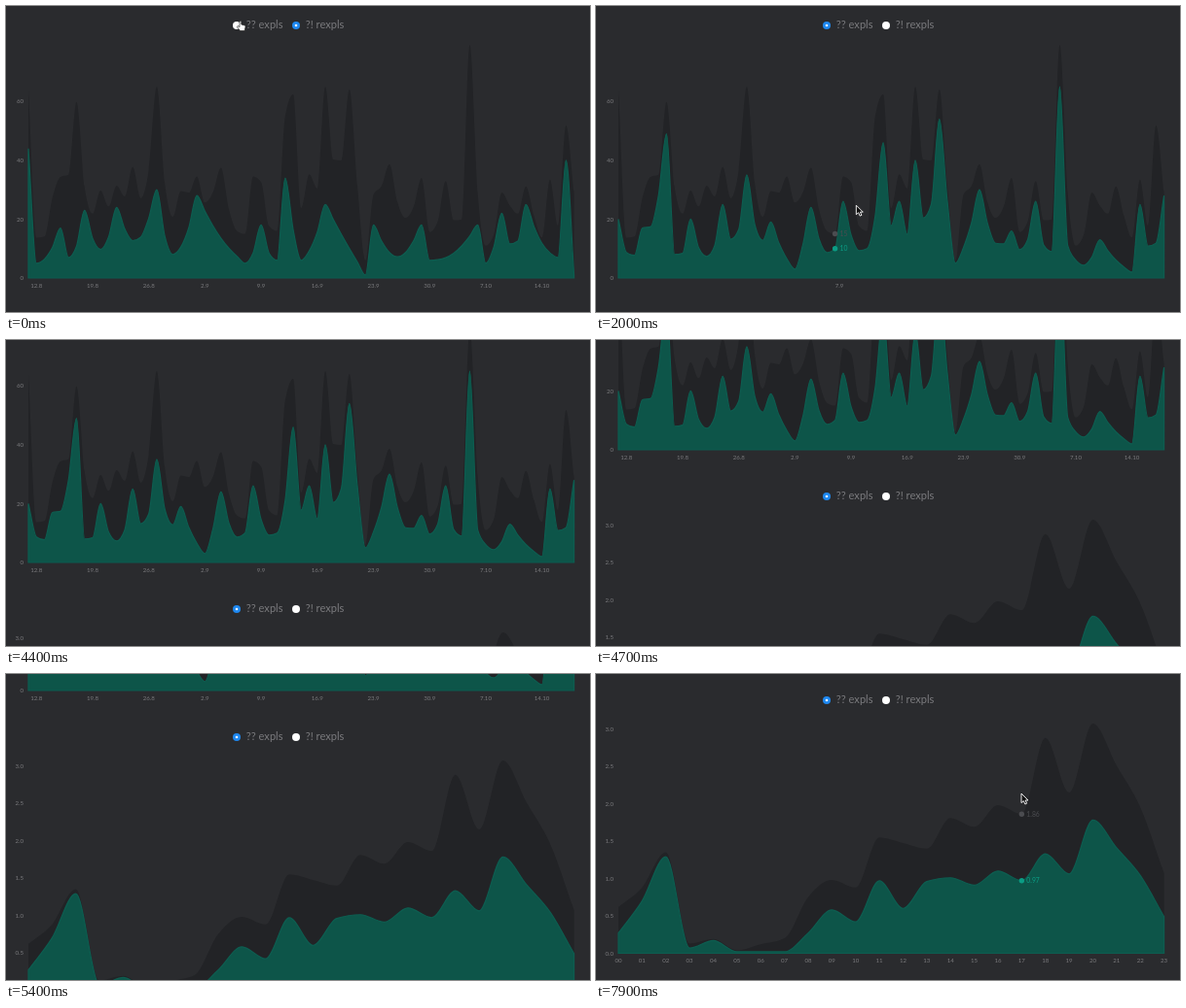
Write an HTML page that moves like this. It is 600 px wide and 315 px high and loops after 8 s.

```html
<!DOCTYPE html>
<html lang="en">
<head>
<meta charset="utf-8">
<title>Charts</title>
<style>
  html, body { margin: 0; width: 100%; height: 100%; overflow: hidden; background: #2a2b2e; }
  svg { display: block; width: 100vw; height: 100vh; }
  text { font-family: Lato, "Open Sans", sans-serif; }
  .tick { font-size: 6.1px; fill: #7b7b7e; }
  .legend { font-size: 11.1px; fill: #7a7a7d; }
  .total { fill: #222326; }
  .part { fill: #0d5549; stroke: #0d5d50; stroke-width: 1.2; }
</style>
</head>
<body>
<svg id="stage" viewBox="0 0 600 315"></svg>
<script>
const LOOP = 8000, LEFT = 23, WIDTH = 560.6;
const stage = document.getElementById('stage');

const clamp = (v, lo, hi) => Math.max(lo, Math.min(hi, v));
const lerp = (a, b, p) => a + (b - a) * p;
const part = (t, from, to) => clamp((t - from) / (to - from), 0, 1);
const easeOut = (p, power) => 1 - (1 - p) ** power;
const easeInOut = p => (1 - Math.cos(Math.PI * p)) / 2;

// Fills the gaps between key values; the line sags between two high ones
function fill(keys, sag = 0) {
  const at = Object.keys(keys).map(Number), out = [keys[0]];
  for (let k = 1; k < at.length; k++) {
    const from = at[k - 1], to = at[k], a = keys[from], b = keys[to];
    for (let i = from + 1; i <= to; i++) {
      const p = (i - from) / (to - from);
      out.push(lerp(a, b, p) - sag * Math.min(a, b) * Math.sin(Math.PI * p));
    }
  }
  return out;
}

const rexpls = fill({ 0: 44, 1: 5, 4: 17, 5: 7, 7: 23, 11: 24, 16: 30, 18: 8, 21: 28, 27: 5, 29: 18,
  31: 6, 32: 34, 34: 6, 37: 25, 42: 1, 43: 18, 49: 18, 50: 6, 56: 18, 57: 5, 59: 22, 62: 25, 66: 7,
  67: 40, 68: 1 }, .6);
const expls = fill({ 0: 20, 3: 17, 6: 49, 7: 8, 9: 20, 12: 11, 13: 25, 16: 35, 19: 19, 22: 3, 24: 24,
  27: 10, 28: 26, 31: 10, 33: 46, 35: 26, 37: 40, 40: 54, 42: 5, 45: 30, 49: 16, 52: 26, 54: 9, 55: 65,
  56: 11, 60: 13, 64: 2, 65: 25, 68: 28 }, .7);
const daily = expls.map((v, i) => v + rexpls[i]);

const hourly = fill({ 0: .27, 1: .7, 2: 1.29, 3: .07, 4: .17, 5: .02, 7: .02, 8: .27, 9: .58, 10: .42,
  11: .97, 12: .6, 13: .96, 14: 1.01, 15: .91, 16: 1.1, 17: .97, 18: 1.33, 19: 1.06, 20: 1.78,
  22: 1.04, 23: .49 });
const hourlyTotal = fill({ 0: .62, 1: .88, 2: 1.35, 3: .13, 4: .19, 5: .04, 7: .2, 8: .75, 9: .98,
  10: .88, 11: 1.55, 13: 1.4, 14: 1.81, 15: 1.69, 16: 1.98, 17: 1.86, 18: 2.88, 19: 2.15, 20: 3.07,
  22: 1.95, 23: 1.07 });

function scrollAt(t) {
  return Math.round(178 * easeInOut(part(t, 4176, 4800)) + 123 * easeOut(part(t, 4920, 6400), 3));
}

// Cursor moves: start, end, x, y
const moves = [
  [950, 1600, 168, 172], [1800, 2200, 300, 216], [2450, 3080, 334, 322],
  [6430, 7150, 298, 39], [7350, 7900, 437, 123]
];
function cursorAt(t) {
  return moves.reduce(([x, y], [from, to, nx, ny]) => {
    const p = easeOut(part(t, from, to), 2);
    return [lerp(x, nx, p), lerp(y, ny, p)];
  }, [240, 15]);
}

function set(el, attrs) {
  for (const k in attrs) el.setAttribute(k, attrs[k]);
}
function add(parent, tag, attrs = {}, text) {
  const el = document.createElementNS('http://www.w3.org/2000/svg', tag);
  set(el, attrs);
  if (text !== undefined) el.textContent = text;
  parent.append(el);
  return el;
}
const show = (el, on) => set(el, { visibility: on ? 'visible' : 'hidden' });

// Monotone cubic through evenly spaced points
function curve(ys, step) {
  const d = ys.slice(1).map((y, i) => (y - ys[i]) / step);
  const m = ys.map((_, i) => {
    const a = d[i - 1], b = d[i];
    if (a === undefined) return b;
    if (b === undefined) return a;
    return a * b <= 0 ? 0 : Math.sign(a) * Math.min(Math.abs(a), Math.abs(b), Math.abs(a + b) / 4) * 2;
  });
  let path = `M${LEFT} ${ys[0].toFixed(2)}`;
  for (let i = 1; i < ys.length; i++) {
    const x = LEFT + i * step, h = step / 3;
    path += `C${[x - step + h, ys[i - 1] + m[i - 1] * h, x - h, ys[i] - m[i] * h, x, ys[i]]
      .map(v => v.toFixed(2)).join(' ')}`;
  }
  return path;
}

class Chart {
  constructor(parent, options) {
    Object.assign(this, options);
    this.step = WIDTH / (this.total.length - 1);
    const g = add(parent, 'g');
    this.radios = [[237, '?? expls'], [298, '?! rexpls']].map(([x, label]) => {
      const disc = add(g, 'circle', { cx: x, cy: this.legendY, r: 4 });
      add(g, 'circle', { cx: x, cy: this.legendY, r: 1.3, fill: '#fff' });
      add(g, 'text', { x: x + 9.8, y: this.legendY + 3.4, class: 'legend' }, label);
      return disc;
    });
    add(g, 'path', { class: 'total', d: this.area(this.total) });
    this.front = add(g, 'path', { class: 'part' });
    for (let v = 0; v <= this.yMax; v += this.yStep)
      add(g, 'text', { x: 18, y: this.y(v) + 2.2, class: 'tick', 'text-anchor': 'end' }, v.toFixed(this.digits));
    this.ticks = add(g, 'g');
    for (let i = this.first; i < this.total.length; i += this.every)
      this.tick(this.ticks, this.x(i), this.name(i));
    this.hover = add(g, 'g');
    this.marks = ['#4b4c50', '#0b9c84'].map(fill => ({
      dot: add(this.hover, 'circle', { r: 2.7, fill }),
      label: add(this.hover, 'text', { fill, 'font-size': 6.8 })
    }));
    this.hoverTick = this.tick(this.hover, 0, '');
  }
  x(i) { return LEFT + i * this.step; }
  y(v) { return this.base - v * this.unit; }
  area(values) {
    return `${curve(values.map(v => this.y(v)), this.step)}V${this.base}H${LEFT}Z`;
  }
  tick(parent, x, label) {
    return add(parent, 'text', { x, y: this.base + 9.6, class: 'tick', 'text-anchor': 'middle' }, label);
  }
  draw(values, chosen, pointer) {
    set(this.front, { d: this.area(values) });
    this.radios.forEach((r, i) => set(r, { fill: i === chosen ? '#1e88f0' : '#fff' }));
    const on = pointer !== null && pointer.y > this.base - 232 && pointer.y < this.base + 6;
    show(this.hover, on);
    show(this.ticks, !on || !this.swapTicks);
    show(this.hoverTick, on && this.swapTicks);
    if (!on) return;
    const i = clamp(Math.round((pointer.x - LEFT) / this.step), 0, values.length - 1);
    [this.total[i], values[i]].forEach((v, n) => {
      const { dot, label } = this.marks[n];
      set(dot, { cx: this.x(i), cy: this.y(v) });
      set(label, { x: this.x(i) + 5, y: this.y(v) + 2.5 });
      label.textContent = v.toFixed(this.digits && 2);
    });
    set(this.hoverTick, { x: this.x(i) + 4.5 });
    this.hoverTick.textContent = this.name(i);
  }
}

function dayName(i) {
  const d = new Date(2021, 7, 11 + i);
  return `${d.getDate()}.${d.getMonth() + 1}`;
}

const page = add(stage, 'g');
const days = new Chart(page, {
  total: daily, legendY: 20, base: 280, unit: 3.03, digits: 0, yMax: 60, yStep: 20,
  first: 1, every: 7, name: dayName, swapTicks: true
});
const hours = new Chart(page, {
  total: hourlyTotal, legendY: 328, base: 588.5, unit: 77, digits: 1, yMax: 3, yStep: .5,
  first: 0, every: 1, name: i => String(i).padStart(2, '0'), swapTicks: false
});

const arrow = add(stage, 'path', {
  d: 'M0 0V9.6L2.3 7.6L3.9 11L5.6 10.2L4.1 7H7Z', fill: '#111', stroke: '#fff', 'stroke-width': .9
});
const hand = add(stage, 'path', {
  d: 'M0 .8Q1 -.4 1.8 .8V4L5.4 5Q6.2 5.4 6 6.6L5.2 10.6H.6L-2.6 6.6Q-2.4 5 -.8 6L0 6.6Z',
  fill: '#fff', stroke: '#222', 'stroke-width': .7
});

function render(t) {
  const scroll = scrollAt(t);
  set(page, { transform: `translate(0 ${-scroll})` });

  // The hover marks trail the cursor slightly
  const [hx, hy] = cursorAt(t - 60);
  const pointer = hy < 305 ? { x: hx, y: hy + scroll } : null;
  const p = easeOut(part(t, 50, 1050), 3);
  days.draw(rexpls.map((v, i) => lerp(v, expls[i], p)), t < 60 ? 1 : 0, pointer);
  hours.draw(hourly, 0, pointer);

  const [x, y] = cursorAt(t);
  const pointing = y < 28;
  show(hand, pointing);
  show(arrow, !pointing);
  set(pointing ? hand : arrow, { transform: `translate(${x} ${y})` });
}

const start = performance.now();
function loop() {
  render((performance.now() - start) % LOOP);
  requestAnimationFrame(loop);
}
loop();
</script>
</body>
</html>
```
